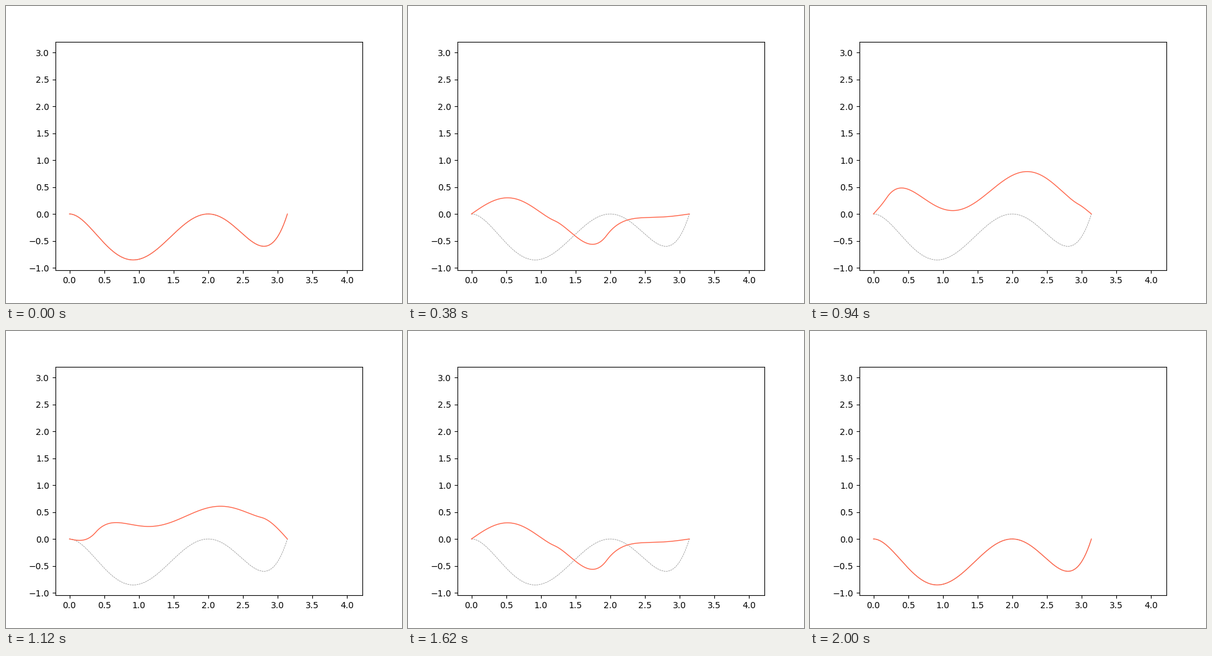
These frames come from a looping animation (640 px wide and 480 px high, 2.02 s). A matplotlib script:

```python
import numpy as np
import matplotlib.pyplot as plt
from matplotlib.animation import FuncAnimation

FRAMES = 101
INTERVAL = 20


def shape(x):
    """Initial displacement of a string fixed at 0 and pi."""
    return -x * np.sin(x) * (x - 2) ** 2


def extended(x):
    """Odd, 2*pi-periodic extension of the initial shape."""
    x = (x + np.pi) % (2 * np.pi) - np.pi
    return np.sign(x) * shape(np.abs(x))


def string(x, t):
    """d'Alembert solution for a string released at rest."""
    return (extended(x + t) + extended(x - t)) / 2


def limits(low, high, margin=0.05):
    pad = margin * (high - low)
    return low - pad, high + pad


x = np.linspace(0, np.pi, 400)
times = np.linspace(0, 2 * np.pi, FRAMES)

fig, ax = plt.subplots(figsize=(6.4, 4.8), dpi=100)
ax.set_xlim(limits(0, 4.022))
ax.set_ylim(limits(shape(x).min(), 3.008))
ax.plot(x, shape(x), "--", color="gray", lw=0.5)
wave, = ax.plot(x, shape(x), color="tomato", lw=1)


def update(i):
    wave.set_ydata(string(x, times[i]))
    return wave,


anim = FuncAnimation(fig, update, frames=FRAMES, interval=INTERVAL,
                     repeat=True, repeat_delay=0)
plt.show()
```
